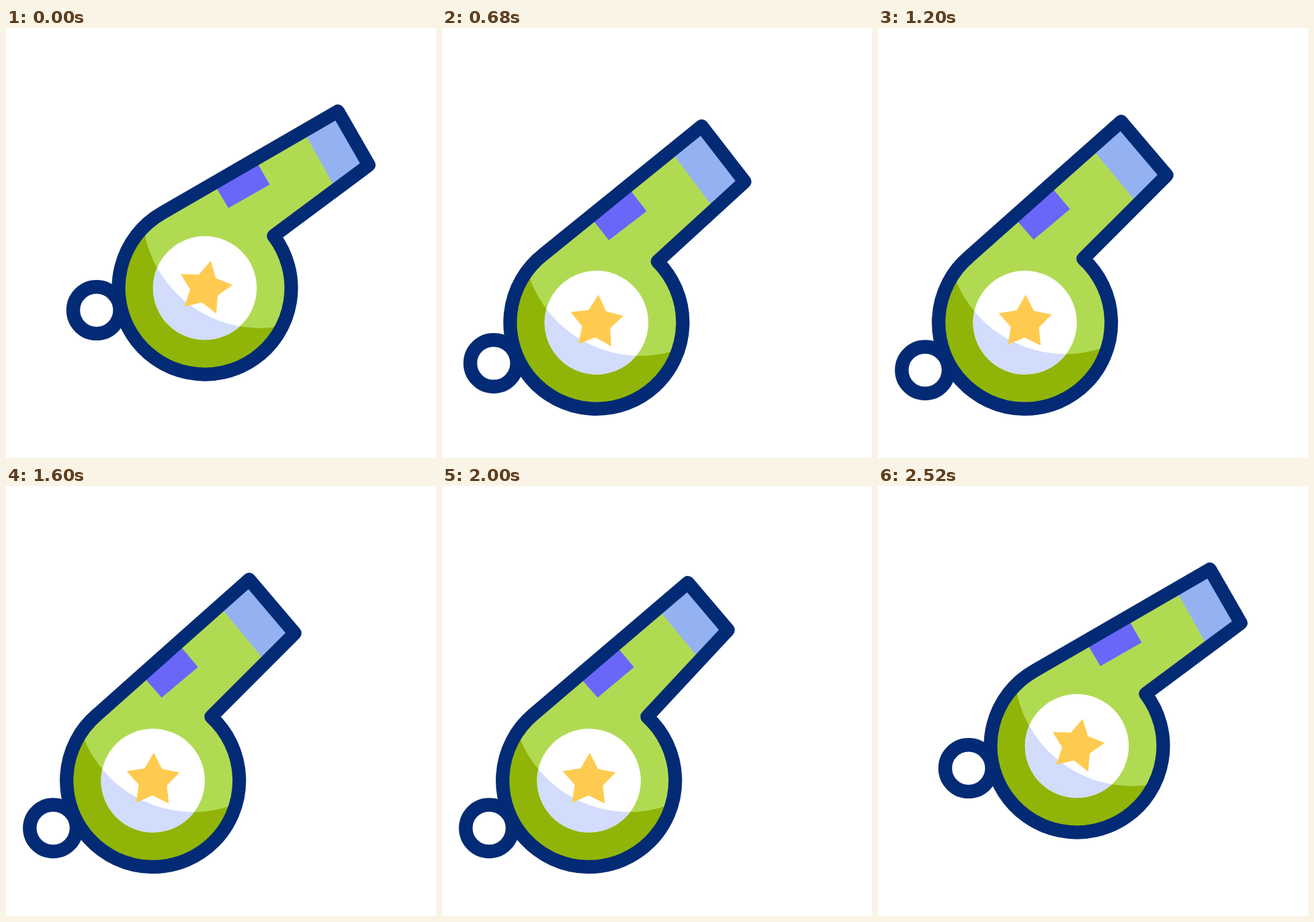
An HTML page that plays this animation: 640x640 px, repeating every 2600 ms.

```html
<!DOCTYPE html>
<html lang="en">
<head>
<meta charset="utf-8">
<title>Whistle</title>
<style>
  html, body { margin: 0; width: 100%; height: 100%; overflow: hidden; background: #fff; }
  svg { display: block; width: 100%; height: 100%; }
</style>
</head>
<body>
<svg viewBox="0 0 640 640">
  <circle id="ring" r="34.8" fill="#fff" stroke="#032b75" stroke-width="20.4"/>
  <g id="whistle">
    <path id="fill" fill="#b1da53"/>
    <path id="shade" fill="#90b508"/>
    <path id="tip" fill="#94b1f2"/>
    <path id="slot" fill="#6a66fa"/>
    <circle r="77.2" fill="#fff"/>
    <path id="discShade" fill="#d2dcfd"/>
    <path id="star" fill="#fecb50"/>
    <path id="outline" fill="none" stroke="#032b75" stroke-width="20.2" stroke-linejoin="round"/>
  </g>
</svg>
<script>
const LOOP = 2600, STEP = 40, RAD = Math.PI / 180;
const BODY = 128.5, DISC = 77.2;
const $ = id => document.getElementById(id);
const set = (id, name, value) => $(id).setAttribute(name, value);
const polar = (r, deg) => [r * Math.cos(deg * RAD), r * Math.sin(deg * RAD)];
const mix = (a, b, k) => a.map((v, i) => v + (b[i] - v) * k);
const poly = pts => 'M' + pts.join('L') + 'Z';

const part = (t, from, to) => Math.min(1, Math.max(0, (t - from) / (to - from)));
const ease = (t, from, to) => (1 - Math.cos(Math.PI * part(t, from, to))) / 2;
const bump = (t, from, to) => Math.sin(Math.PI * part(t, from, to));

// Hop up from home, drop into the blowing pose between from and to, then return
const move = (t, home, lift, blow, from, to) => home
  + (lift - home) * ease(t, 200, 360)
  + (blow - lift) * ease(t, from, to)
  + (home - blow) * ease(t, 2000, 2440);

// Part of a centred disc that lies outside the large highlight circle
function crescent(r) {
  const cx = 82.4, cy = -116.3, R = 176, d = Math.hypot(cx, cy);
  const mid = Math.atan2(cy, cx) / RAD;
  const half = Math.acos((r * r + d * d - R * R) / (2 * d * r)) / RAD;
  const p = polar(r, mid - half), q = polar(r, mid + half);
  return `M${p}A${R} ${R} 0 0 0 ${q}A${r} ${r} 0 ${half < 90 ? 1 : 0} 1 ${p}Z`;
}

set('shade', 'd', crescent(125));
set('discShade', 'd', crescent(DISC));
set('star', 'd', poly(Array.from({ length: 10 }, (_, i) =>
  polar(i % 2 ? 22 : 41.5, 11.9 - 90 + i * 36))));

// The mouth opens by puff on both sides; the rest keeps its form
function shape(puff) {
  const joint = polar(BODY, -120), notch = polar(BODY, -37.2);
  const [dx, dy] = polar(puff, 60);
  const top = [198 - dx, -263 - dy], low = [244 + dx, -183 + dy];
  const path = `M${joint}L${top}L${low}L${notch}A${BODY} ${BODY} 0 1 1 ${joint}Z`;
  set('fill', 'd', path);
  set('outline', 'd', path);
  set('tip', 'd', poly([mix(joint, top, 0.805), top, low, mix(notch, low, 0.655)]));
  set('slot', 'd', poly([mix(joint, top, 0.294), mix(joint, top, 0.53), [96.5, -154], [35, -119]]));
}

function draw(time) {
  const t = Math.floor((time % LOOP) / STEP) * STEP;
  const x = move(t, 296, 316.5, 218.7, 360, 770);
  const y = move(t, 387, 358.6, 438.4, 360, 680) + 2.6 * bump(t, 680, 960);
  const turn = move(t, 0, -5.75, -10.4, 360, 1050);
  const swing = move(t, 0, -11.2, -13.9, 680, 1000) + 1.2 * bump(t, 520, 840);
  shape(6.3 * (ease(t, 520, 700) - ease(t, 1840, 2000)));
  set('whistle', 'transform', `translate(${x} ${y}) rotate(${turn})`);
  const [rx, ry] = polar(164.6, 168.4 + swing);
  set('ring', 'cx', x + rx);
  set('ring', 'cy', y + ry);
}

const start = performance.now();
function tick() {
  draw(performance.now() - start);
  requestAnimationFrame(tick);
}
draw(0);
requestAnimationFrame(tick);
</script>
</body>
</html>
```
